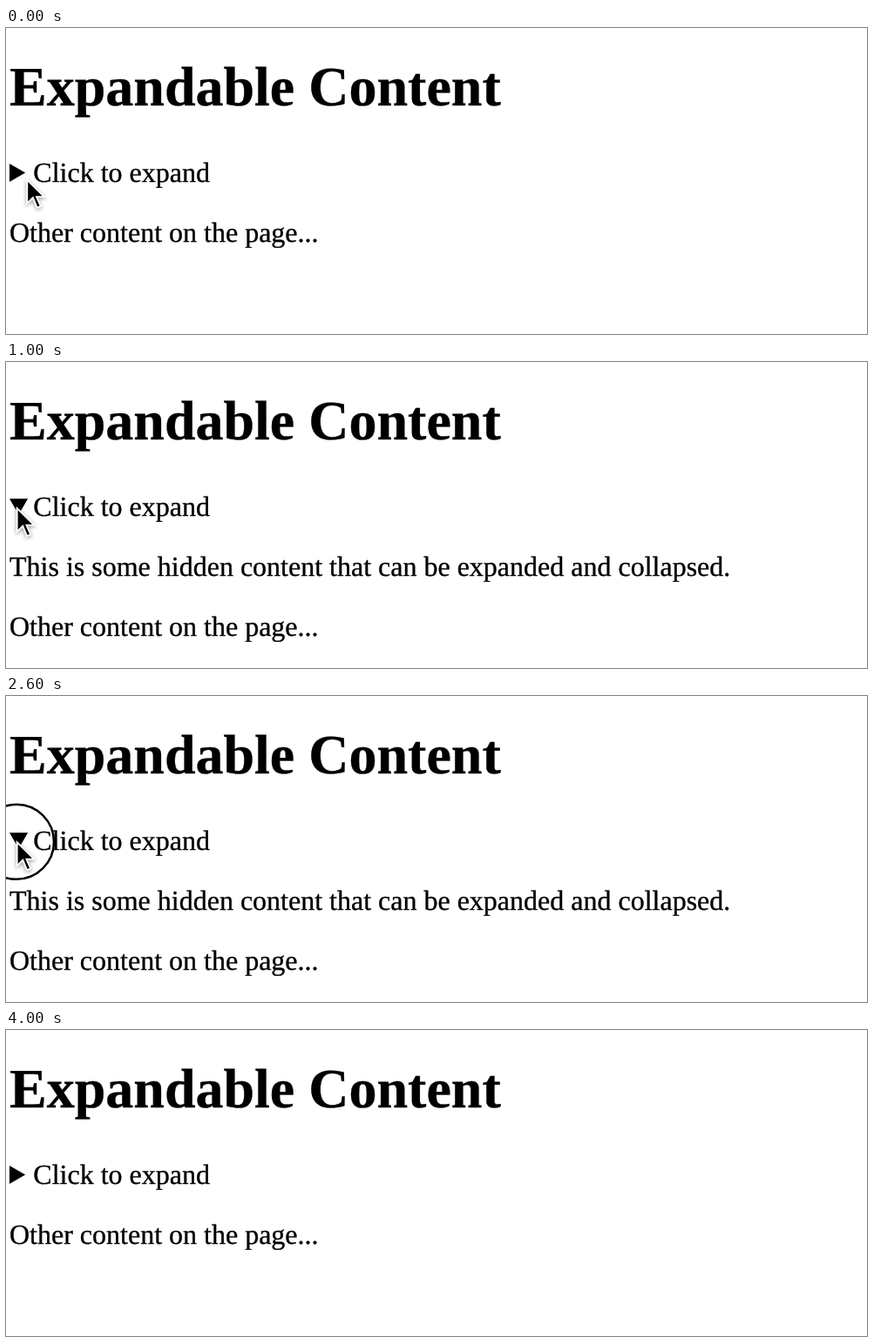
An HTML page with a canvas for the animation above (4.6 s loop, 988 by 352 pixels).

```html
<!DOCTYPE html>
<html lang="en">
<head>
<meta charset="utf-8">
<title>Expandable Content</title>
<style>
  html, body { margin: 0; width: 100%; height: 100%; overflow: hidden; background: #fff; }
  canvas { display: block; width: 988px; height: 352px; }
</style>
</head>
<body>
<canvas id="stage" width="988" height="352"></canvas>
<script>
const ctx = document.getElementById('stage').getContext('2d');
const LOOP = 4600, STEP = 100;
const SERIF = '"Liberation Serif", "Times New Roman", serif';
const EM = 32, LEFT = 4, BASE = 177, LINE = 69;
const START = { x: 25.2, y: 177 }, REST = { x: 13.6, y: 170.5 };

const within = (t, from, to) => t >= from && t < to;
const progress = (t, from, to) => Math.min(1, Math.max(0, (t - from) / (to - from)));

function trace(...points) {
  ctx.beginPath();
  for (const [x, y] of points) ctx.lineTo(x, y);
  ctx.closePath();
}

function text(str, x, y, size = EM, weight = 'normal') {
  ctx.font = `${weight} ${size}px ${SERIF}`;
  ctx.textRendering = 'geometricPrecision';
  ctx.fillText(str, x, y);
  // A hairline gives the slightly heavier look of smoothed type.
  ctx.lineWidth = 0.35;
  ctx.strokeText(str, x, y);
}

// One triangle, turned a quarter when open.
function marker(open) {
  const size = EM * 0.66, half = size / 2;
  ctx.save();
  ctx.translate(LEFT + half, BASE - half);
  if (open) ctx.rotate(Math.PI / 2);
  const back = open ? 0.43 * size : half;
  trace([-back, -half], [0.86 * size - back, 0], [-back, half]);
  ctx.fill();
  ctx.restore();
}

// Glides to the marker, rests, then speeds away downwards.
function pointerAt(t) {
  const near = progress(t, 400, 600), away = progress(t, 3000, 3300) ** 2;
  return {
    x: START.x + (REST.x - START.x) * near + 17 * away,
    y: START.y + (REST.y - START.y) * near + 89 * away
  };
}

function pointer({ x, y }) {
  ctx.save();
  ctx.translate(x, y);
  ctx.scale(2, 2);
  trace([0, 0], [0, 11.2], [3, 8.3], [5.5, 14.2], [6.7, 13.7], [4.2, 8.1], [8.2, 8.1]);
  ctx.shadowColor = 'rgba(0,0,0,0.4)';
  ctx.shadowBlur = 4;
  ctx.shadowOffsetY = 1.5;
  ctx.lineWidth = 1.9;
  ctx.strokeStyle = '#fff';
  ctx.stroke();
  ctx.shadowColor = 'transparent';
  ctx.fill();
  ctx.restore();
}

function ring() {
  ctx.beginPath();
  ctx.arc(12, 167.8, 43, 0, Math.PI * 2);
  ctx.lineWidth = 2.5;
  ctx.stroke();
}

function draw(t) {
  const open = within(t, 1000, 2900);
  ctx.clearRect(0, 0, 988, 352);
  ctx.fillStyle = ctx.strokeStyle = '#000';

  text('Expandable Content', LEFT, 89, EM * 2, 'bold');
  marker(open);
  text('Click to expand', 31.3, BASE);
  if (open) text('This is some hidden content that can be expanded and collapsed.', LEFT, BASE + LINE);
  text('Other content on the page...', LEFT, BASE + LINE * (open ? 2 : 1));

  if (within(t, 700, 900) || within(t, 2600, 2900)) ring();
  if (t < 3400) pointer(pointerAt(t));
}

const start = performance.now();
function tick() {
  const t = (performance.now() - start) % LOOP;
  draw(Math.floor(t / STEP) * STEP);
  requestAnimationFrame(tick);
}
tick();
</script>
</body>
</html>
```
